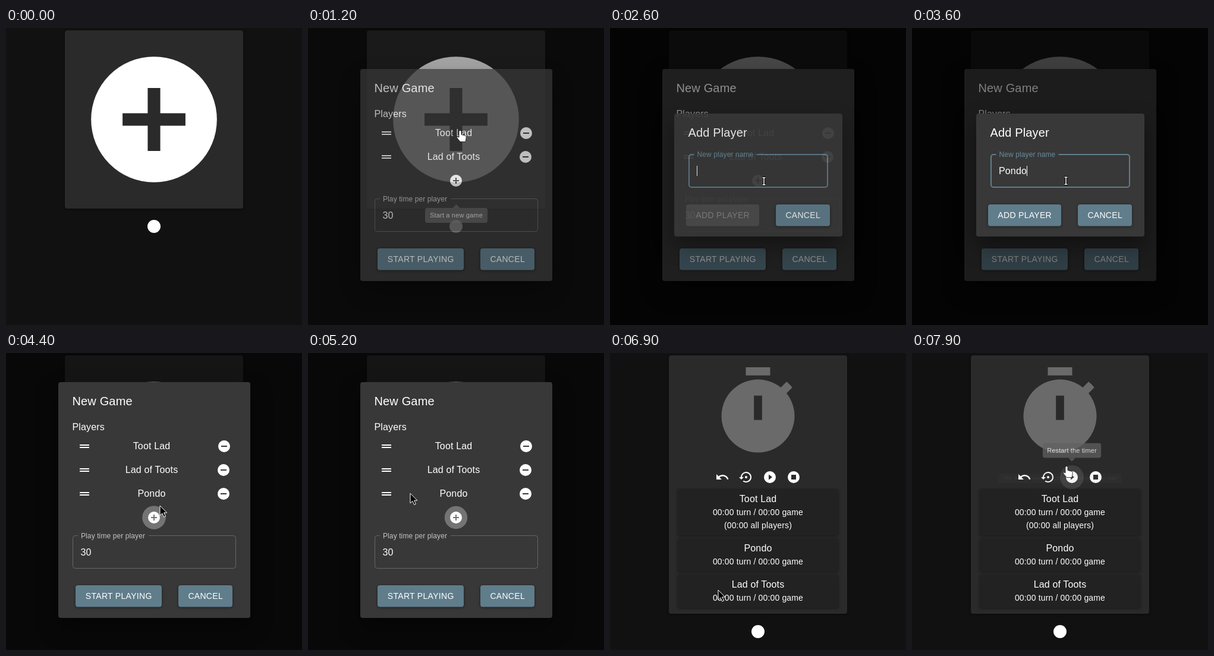
Write an HTML page that moves like this. It is 498 px wide and 500 px high and loops after 8 s.

```html
<!DOCTYPE html>
<html lang="en">
<head>
<meta charset="utf-8">
<title>Game timer</title>
<style>
  html, body { margin: 0; height: 100%; overflow: hidden; background: #111; }
  svg { display: block; width: 100vw; height: 100vh; }
  text { font-family: "Liberation Sans", Arial, sans-serif; white-space: pre; }
  .card { filter: drop-shadow(0 1px 2px rgba(0, 0, 0, .45)); }
  .dialog { filter: drop-shadow(0 16px 18px rgba(0, 0, 0, .4)); }
</style>
</head>
<body>
<svg id="stage" viewBox="0 0 498 500"></svg>
<script>
const LOOP = 8000, STEP = 100;      // the screen is refreshed ten times a second
const PAPER = '#383838', CARD = '#2a2a2a', BLUE = '#607d8b';
const FIRST = 'Toot Lad', SECOND = 'Lad of Toots', ADDED = 'Pondo';
const KEYS = [3100, 3200, 3300, 3400, 3600];
const ADDED_AT = 3900, PLAY_AT = 6900;

const DISC = 'M2 12a10 10 0 1 0 20 0a10 10 0 1 0-20 0z';
const ICONS = {
  add: DISC + 'M17 13h-4v4h-2v-4H7v-2h4V7h2v4h4z',
  remove: DISC + 'M17 13H7v-2h10z',
  play: DISC + 'M10 16.5v-9l6 4.5z',
  stop: DISC + 'M16 16H8V8h8z',
  drag: 'M4 9h16v2H4zM4 13h16v2H4z',
  undo: 'M12.5 8c-2.65 0-5.05 1-6.9 2.6L2 7v9h9l-3.62-3.62c1.39-1.16 3.16-1.88 5.12-1.88 3.54 0 6.55 2.31 7.6 5.5l2.37-.78C21.08 11.03 17.15 8 12.5 8z',
  restart: 'M10 12a2 2 0 1 0 4 0a2 2 0 1 0-4 0zM12 3a9 9 0 0 0-9 9H0l4 4 4-4H5a7 7 0 1 1 2.94 5.7l-1.42 1.44A9 9 0 1 0 12 3z',
  timer: 'M9 1h6v2H9zM19.03 7.39l1.42-1.42q-.65-.77-1.41-1.41l-1.42 1.42A9 9 0 1 0 19.03 7.39zM13 14h-2V8h2z'
};

const CURSORS = {
  arrow: '<path d="M0 0V16.5l3.8-3.6 2.9 6.3 2.8-1.2-2.9-6.1h5.2z" fill="#000" stroke="#fff"/>',
  hand: '<path d="M-2 1.5a2 2 0 0 1 4 0V6.5l6 1.5q2.5.7 2.3 3l-1.2 7.5H0l-5.5-7q0-2.5 3.5-.5z" fill="#fff" stroke="#111" stroke-width=".8"/>',
  beam: '<path d="M-3-6h6M-3 6h6M0-6V6" stroke="#000" stroke-width="3.5"/><path d="M-2.5-6h5M-2.5 6h5M0-6V6" stroke="#fff" stroke-width="1.5"/>'
};

// time, x, y, pointer shape from here on
const MOUSE = [
  [400, 485, 384, 'arrow'], [500, 385, 285, 'hand'], [600, 290, 205, 'hand'], [700, 256, 173, 'hand'],
  [1400, 256, 173, 'arrow'], [1700, 258, 238, 'hand'], [1900, 259, 257, 'hand'], [2500, 259, 258, 'beam'],
  [3900, 259, 257, 'arrow'], [4600, 259, 257, 'arrow'], [4900, 252, 233, 'arrow'], [5000, 252, 233, 'arrow'],
  [5300, 132, 238, 'hand'], [5400, 132, 238, 'hand'], [5600, 132, 198, 'arrow'], [5800, 382, 133, 'arrow'],
  [5900, 325, 350, 'beam'], [6000, 310, 345, 'beam'], [6200, 215, 385, 'hand'], [6400, 182, 399, 'hand'],
  [6900, 182, 399, 'arrow'], [7100, 205, 300, 'arrow'], [7300, 238, 165, 'hand'], [7500, 255, 139, 'hand'],
  [7700, 255, 139, 'hand'], [7800, 260, 191, 'hand'], [8000, 260, 191, 'hand']
];

const clamp = v => Math.min(1, Math.max(0, v));
const lerp = (a, b, k) => a + (b - a) * k;

// cubic-bezier(.4, 0, .2, 1)
function ease(x) {
  x = clamp(x);
  let lo = 0, hi = 1;
  for (let i = 0; i < 20; i++) {
    const s = (lo + hi) / 2, r = 1 - s;
    if (1.2 * r * r * s + .6 * r * s * s + s * s * s < x) lo = s; else hi = s;
  }
  return lo * lo * (3 - 2 * lo);
}
const ramp = (t, start, length = 225) => ease((t - start) / length);

const rect = (x, y, w, h, fill, extra = '') =>
  `<rect x="${x}" y="${y}" width="${w}" height="${h}" rx="4" fill="${fill}" ${extra}/>`;
const circle = (x, y, r, fill, opacity = 1) =>
  `<circle cx="${x}" cy="${y}" r="${r}" fill="${fill}" opacity="${opacity}"/>`;
const text = (s, x, y, size = 16, fill = '#fff', anchor = 'start', spacing = .15) =>
  `<text x="${x}" y="${y}" font-size="${size}" fill="${fill}" text-anchor="${anchor}" letter-spacing="${spacing}">${s}</text>`;
const centred = (s, x, y, size, fill, spacing) => text(s, x, y, size, fill, 'middle', spacing);
const icon = (name, x, y, size = 24, fill = '#fff') =>
  `<path d="${ICONS[name]}" fill="${fill}" fill-rule="evenodd" transform="translate(${x - size / 2} ${y - size / 2}) scale(${size / 24})"/>`;
const layer = (opacity, content) => opacity > 0 ? `<g opacity="${opacity}">${content}</g>` : '';
const backdrop = opacity => `<rect width="498" height="500" opacity="${opacity / 2}"/>`;

const button = (label, x, y, w, fill = BLUE, color = '#fff') =>
  rect(x, y, w, 36.5, fill, 'class="card"') + centred(label, x + w / 2 + .2, y + 23, 14, color, .3);

function field(x, y, w, h, label, labelWidth, color, stroke, line) {
  return rect(x, y, w, h, 'none', `stroke="${stroke}" stroke-width="${line}"`) +
    `<rect x="${x + 8.5}" y="${y - 2}" width="${labelWidth}" height="4" fill="${PAPER}"/>` +
    text(label, x + 13.5, y + 4, 12, color, 'start', .1);
}

function tooltip(t, label, x, y, w, start, end, above = false) {
  const opacity = ramp(t, start, 200) * (1 - ramp(t, end, 200));
  const scale = .75 + .25 * ramp(t, start, 133) * (1 - ramp(t, end + 67, 133));
  const top = above ? -25 : 0;
  const arrow = above ? 'M-6 0L0 6L6 0z' : 'M-6 0L0-6L6 0z';
  return layer(opacity, `<g transform="translate(${x} ${y}) scale(${scale} ${scale * scale})">` +
    `<g fill="#616161" opacity=".92">${rect(-w / 2, top, w, 25, '#616161')}<path d="${arrow}"/></g>` +
    centred(label, 0, top + 16.3, 11, '#fff', .17) + '</g>');
}

function home() {
  return rect(99, 4, 300, 300, CARD, 'class="card"') + icon('add', 249, 154, 254) + circle(249, 334, 11, '#fff');
}

function playerRow(name, y, iconX, lit = false) {
  return (lit ? rect(112, y - 20, 275, 40, '#696969') : '') +
    icon('drag', 132, y) + centred(name, 245, y + 5) + icon('remove', iconX, y);
}

function players(t, y) {
  if (t < ADDED_AT) return playerRow(FIRST, y, 367) + playerRow(SECOND, y + 40, 366);
  const dragged = clamp((t - 5400) / 200);
  return playerRow(FIRST, y, 367) +
    playerRow(SECOND, y + 40 + 40 * ramp(t, 5450, 150), 366) +
    playerRow(ADDED, y + 80 - 40 * dragged, 366, t >= 5300 && t < 5900);
}

function addButton(t, y) {
  let halo = '';
  if (t >= 3950 && t < 6600) {
    const pulse = 1 - .02 * (1 - Math.cos((Math.max(t, 4150) - 4150) / 2500 * 2 * Math.PI));
    halo = circle(249, y, 20 * pulse * ramp(t, 3950, 500), '#fff', .3);
  } else if (t >= 1900 && t < 2600) {
    halo = circle(249, y, 20, '#fff', t >= 2400 ? .25 : .08);
  }
  return halo + icon('add', 249, y);
}

function newGameDialog(t) {
  const grow = t >= ADDED_AT ? 20 : 0, low = grow;
  const fieldHover = t >= 5900 && t < 6200;
  return rect(88, 69 - grow, 323, 357 + 2 * grow, PAPER, 'class="dialog"') +
    text('New Game', 111.5, 108 - grow, 20) +
    text('Players', 111.5, 150 - grow) +
    players(t, 177 - grow) +
    addButton(t, 257 + low) +
    field(112.5, 287.5 + low, 274, 55, 'Play time per player', 119, '#c3c3c3', fieldHover ? '#fff' : '#666', 1) +
    text('30', 125.5, 321 + low) +
    button('START PLAYING', 117, 371 + low, 145, t >= 6200 ? `rgb(${[[96, 67], [125, 87], [139, 97]].map(([a, b]) => lerp(a, b, ramp(t, 6180, 250)))})` : BLUE) +
    button('CANCEL', 290, 371 + low, 91);
}

function addPlayerDialog(t) {
  const typed = KEYS.filter(k => k <= t).length;
  const caret = 146.5 + typed * 9.05 + (typed ? 1.7 : 0);
  const enabled = ramp(t, KEYS[0] - 50, 250);
  return rect(108, 144, 283, 207, PAPER, 'class="dialog"') +
    text('Add Player', 131.5, 183, 20) +
    field(133, 213, 233, 55, 'New player name', 105, '#6a8b9b', BLUE, 2) +
    text(ADDED.slice(0, typed), 146, 246) +
    `<path d="M${caret} 232v17" stroke="#fff"/>` +
    layer(1 - enabled, rect(128, 297, 123, 36.5, '#4d4d4d') + centred('ADD PLAYER', 189.7, 320, 14, '#858585', .3)) +
    layer(enabled, button('ADD PLAYER', 128, 297, 123)) +
    button('CANCEL', 279, 297, 91);
}

function panel(name, y, h, note = '') {
  return rect(114, y, 270, h, '#222', 'class="card"') + centred(name, 249, y + 22) +
    centred('00:00 turn / 00:00 game', 249, y + 44, 14) + centred(note, 249, y + 66, 14);
}

function game(t) {
  return rect(99, 4, 300, 435, CARD, 'class="card"') +
    icon('timer', 249, 99.2, 164, '#6a6a6a') +
    (t >= 7800 ? circle(269, 209, 20, '#fff', .1) : '') +
    ['undo', 'restart', 'play', 'stop'].map((name, i) => icon(name, 189 + 40 * i, 209)).join('') +
    panel(FIRST, 229, 78, '(00:00 all players)') + panel(ADDED, 312, 56) + panel(SECOND, 373, 56) +
    circle(249, 469, 11, '#fff') +
    tooltip(t, 'The timer is paused. Click here to continue play', 249, 203, 260, 7450, 7763) +
    tooltip(t, 'Restart the timer', 269, 176.5, 99, 7795, 9000, true);
}

function setup(t) {
  const first = ramp(t, 1097), second = ramp(t, 2463) - ramp(t, 3860, 195);
  return home() +
    layer(first, backdrop(1)) + layer(first, newGameDialog(t)) +
    layer(second, backdrop(1)) + layer(second, addPlayerDialog(t)) +
    tooltip(t, 'Start a new game', 249.5, 303, 105, 560, 1135) +
    tooltip(t, 'Add a player', 249, 291, 80, 1990, 2420);
}

function pointer(t) {
  const next = MOUSE.findIndex(m => m[0] > t);
  if (next < 1) return '';
  const [t0, x0, y0, shape] = MOUSE[next - 1], [t1, x1, y1] = MOUSE[next];
  const k = (t - t0) / (t1 - t0);
  return `<g transform="translate(${lerp(x0, x1, k)} ${lerp(y0, y1, k)})">${CURSORS[shape]}</g>`;
}

const stage = document.getElementById('stage');
const begin = performance.now();
let shown = -1;

function frame() {
  const t = Math.floor((performance.now() - begin) % LOOP / STEP) * STEP;
  if (t !== shown) {
    shown = t;
    stage.innerHTML = (t < PLAY_AT ? setup(t) : game(t)) + pointer(t);
  }
  requestAnimationFrame(frame);
}
frame();
</script>
</body>
</html>
```
